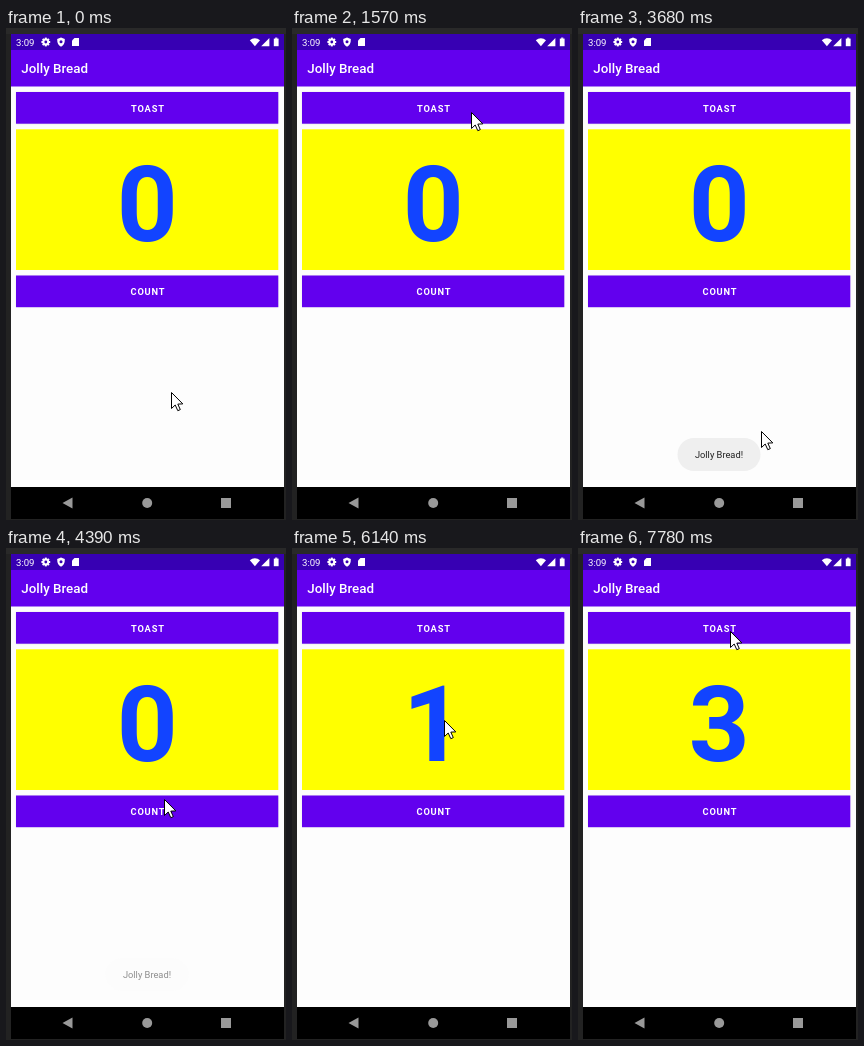
Write an HTML page with a canvas that moves like this. It is 280 by 492 pixels and loops after 8 s.

```html
<!DOCTYPE html>
<html lang="en">
<head>
<meta charset="utf-8">
<title>Counter app</title>
<style>
  html, body { margin: 0; width: 100%; height: 100%; overflow: hidden; background: #222; }
  canvas { display: block; width: 280px; height: 492px; }
</style>
</head>
<body>
<canvas id="stage" width="280" height="492"></canvas>
<script>
const ctx = document.getElementById('stage').getContext('2d');
const LOOP = 8000;
const STEP = 140;
const PURPLE = '#6200ee';
const BAR = '#3700b3';
const APP = 'Jolly Bread';

// Pointer moves: [from, to, x, y]; it rests in between
const home = [166, 364];
const moves = [
  [0, 640, 140, 190], [640, 1030, 205, 262], [1030, 1570, 180, 84],
  [2300, 2870, 170, 440], [2870, 3290, 188, 428], [3290, 4390, 159, 251],
  [4390, 4800, 166, 182], [4800, 5320, 157, 252],
  [5760, 6140, 153, 172], [6140, 6530, 156, 246], [7200, 7780, 153, 83]
];
const toastPress = 2300;
const countPresses = [5620, 6530, 6920];

const clamp = v => Math.max(0, Math.min(1, v));
const ramp = (t, a, b) => clamp((t - a) / (b - a));
const ease = k => k * k * (3 - 2 * k);

// Steps of the screen refresh, counted from a known moment
const snap = (t, anchor) => anchor + Math.floor((t - anchor) / STEP) * STEP;

function pointerAt(t) {
  let [x, y] = home;
  for (const [from, to, toX, toY] of moves) {
    if (t < from) break;
    const k = ease(ramp(snap(t, to), from, to));
    x += (toX - x) * k;
    y += (toY - y) * k;
  }
  return [x, y];
}

function toastAlpha(t) {
  const s = snap(t, 4390);
  return ramp(s, 2430, 2710) * (1 - ramp(s, 4250, 4530));
}

function rect(x, y, w, h, color) {
  ctx.fillStyle = color;
  ctx.fillRect(x, y, w, h);
}

function shape(points, color) {
  ctx.beginPath();
  points.forEach(([x, y]) => ctx.lineTo(x, y));
  ctx.closePath();
  ctx.fillStyle = color;
  ctx.fill();
}

function disc(x, y, r, color) {
  ctx.beginPath();
  ctx.arc(x, y, r, 0, Math.PI * 2);
  ctx.fillStyle = color;
  ctx.fill();
}

function text(str, x, y, size, weight, color, align = 'center', spacing = 0) {
  ctx.font = `${weight} ${size}px Roboto, sans-serif`;
  ctx.letterSpacing = spacing + 'px';
  ctx.textAlign = align;
  ctx.fillStyle = color;
  ctx.fillText(str, x, y);
}

function gear(x, y) {
  for (let i = 0; i < 8; i++) {
    ctx.save();
    ctx.translate(x, y);
    ctx.rotate(i * Math.PI / 4);
    rect(-1, -4.4, 2, 3, '#fff');
    ctx.restore();
  }
  disc(x, y, 3.4, '#fff');
  disc(x, y, 1.4, BAR);
}

function shield(x, y) {
  ctx.beginPath();
  ctx.moveTo(x, y - 4.6);
  ctx.lineTo(x + 3.8, y - 3);
  ctx.quadraticCurveTo(x + 4, y + 3, x, y + 4.7);
  ctx.quadraticCurveTo(x - 4, y + 3, x - 3.8, y - 3);
  ctx.closePath();
  ctx.fillStyle = '#fff';
  ctx.fill();
  disc(x, y - 0.2, 1.5, BAR);
}

function wifi(x, y) {
  ctx.beginPath();
  ctx.moveTo(x, y);
  ctx.arc(x, y, 8, -Math.PI * 0.72, -Math.PI * 0.28);
  ctx.fillStyle = '#fff';
  ctx.fill();
}

function statusBar() {
  rect(5, 6, 273, 16, BAR);
  text('3:09', 10, 17.6, 9.6, 400, '#fff', 'left');
  gear(39.8, 14);
  shield(55, 14);
  shape([[68.5, 10], [73, 10], [73, 18], [66, 18], [66, 12.5]], '#fff');
  wifi(248.9, 18.3);
  shape([[263.4, 10], [263.4, 18.2], [255.2, 18.2]], '#fff');
  rect(267.8, 10.6, 4.8, 7.6, '#fff');
  rect(269.1, 9.6, 2.2, 1.2, '#fff');
}

function button(label, y, pressed) {
  ctx.save();
  ctx.shadowColor = `rgba(0,0,0,${pressed ? 0.26 : 0.1})`;
  ctx.shadowBlur = pressed ? 5 : 2;
  ctx.shadowOffsetY = pressed ? 2 : 0;
  rect(10, y, 262.3, 31.7, PURPLE);
  ctx.restore();
  text(label, 141.9, y + 19.6, 9.3, 600, '#fff', 'center', 0.78);
}

function navBar() {
  rect(5, 459, 273, 32, '#000');
  shape([[56.5, 475], [66.5, 469.6], [66.5, 480.4]], '#999');
  disc(141.2, 475, 5, '#999');
  rect(215, 470, 10, 10, '#999');
}

function toast(alpha) {
  ctx.globalAlpha = alpha ** 4;
  ctx.beginPath();
  ctx.roundRect(99.5, 410, 83, 33, 16.5);
  ctx.fillStyle = '#efefef';
  ctx.fill();
  ctx.globalAlpha = alpha;
  text(APP + '!', 141, 430.4, 9.3, 400, '#222');
  ctx.globalAlpha = 1;
}

function pointer(x, y) {
  ctx.save();
  ctx.translate(Math.round(x) - 0.5, Math.round(y) + 0.5);
  shape([[0, 0], [0, 16], [3.7, 12.5], [6.3, 18.2], [8.8, 17.1], [6.3, 11.6], [11.3, 11.4]], '#fff');
  ctx.strokeStyle = '#000';
  ctx.stroke();
  ctx.restore();
}

function draw(t) {
  const pressed = start => t >= start && t < start + 340;
  const count = countPresses.filter(p => t >= p + STEP).length;

  rect(0, 0, 280, 492, '#222');
  rect(0, 0, 280, 6, '#292929');
  rect(5, 58, 273, 401, '#fdfdfd');
  statusBar();
  rect(5, 22, 273, 36.5, PURPLE);
  text(APP, 15.3, 45.4, 13.4, 500, '#fff', 'left');

  button('TOAST', 64, pressed(toastPress));
  rect(10, 101.3, 262.3, 140.7, '#ff0');
  text(String(count), 141.2, 213, 106.3, 700, '#1244ff');
  button('COUNT', 247.5, countPresses.some(pressed));
  toast(toastAlpha(t));
  navBar();
  pointer(...pointerAt(t));
}

const start = performance.now();
function tick() {
  draw((performance.now() - start + 1) % LOOP);
  requestAnimationFrame(tick);
}
tick();
</script>
</body>
</html>
```
